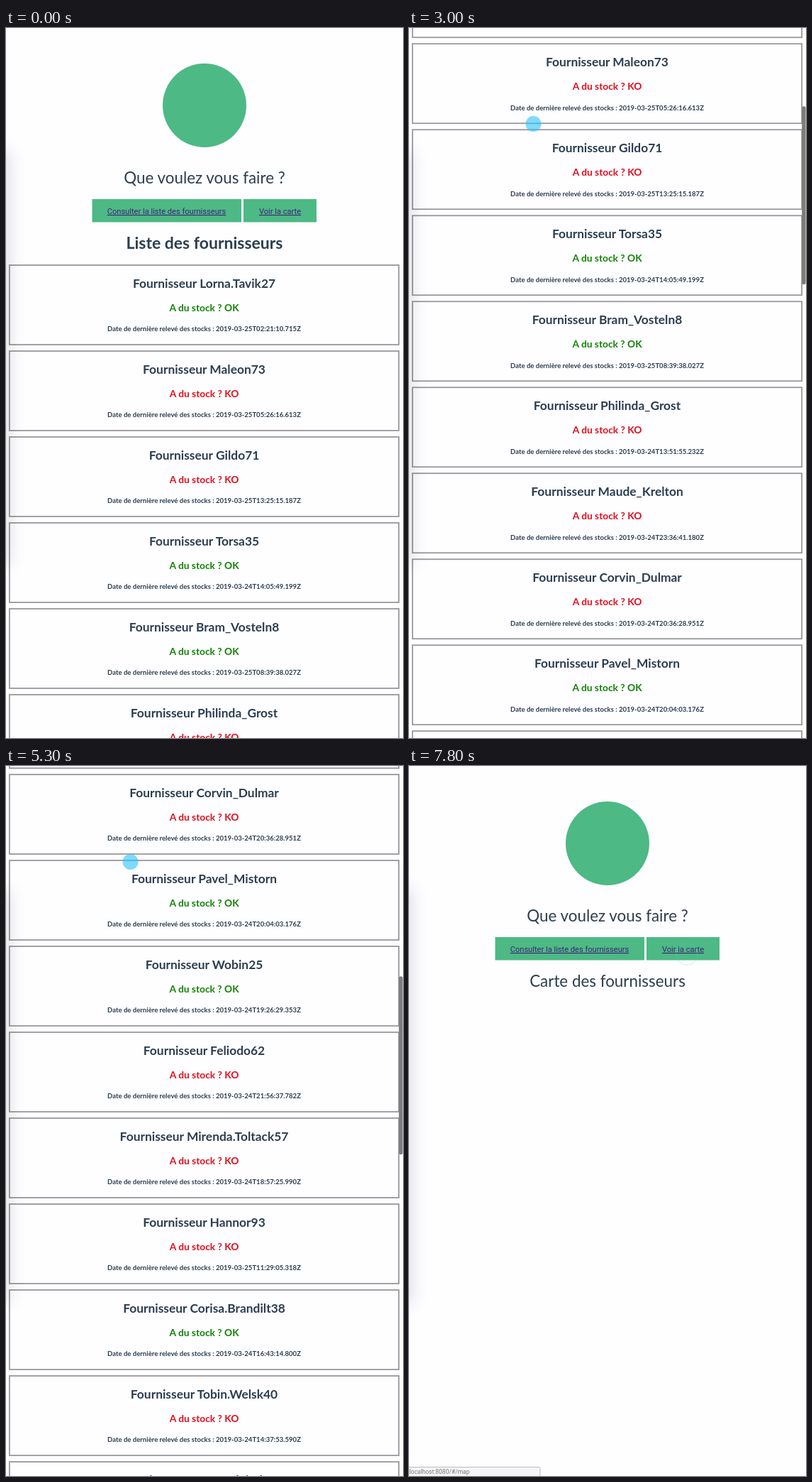
Recreate the animation shown at these times as an HTML page. Size 560 by 1000 pixels, loop 8 s.

```html
<!DOCTYPE html>
<html lang="fr">
<head>
<meta charset="utf-8">
<title>Fournisseurs</title>
<style>
  html, body { margin: 0; width: 100%; height: 100%; overflow: hidden; background: #fefdff; }
  svg { display: block; width: 100%; height: 100%; }
  text { font-family: Lato, sans-serif; fill: #2c3e50; text-anchor: middle; }
  .heading { font-size: 22.4px; }
  .strong { font-size: 23px; font-weight: 700; }
  .name { font-size: 17.4px; font-weight: 700; }
  .stock { font-size: 13.8px; font-weight: 700; }
  .date { font-size: 9.55px; font-weight: 700; }
  .OK { fill: #128205; }
  .KO { fill: #de0f1c; }
  .link { font: 11.1px Roboto, sans-serif; fill: #43207c; text-decoration: underline; }
  .url { font: 8.5px Roboto, sans-serif; fill: #777; text-anchor: start; }
  .card { fill: none; stroke: #999; stroke-width: 1.8; }
  .green { fill: #4db984; }
</style>
</head>
<body>
<svg viewBox="0 0 560 1000">
  <defs>
    <filter id="blur" x="-100%" y="-10%" width="300%" height="120%">
      <feGaussianBlur stdDeviation="12"/>
    </filter>
  </defs>
  <g id="page">
    <circle class="green" cx="280" cy="109" r="59"/>
    <text class="heading" x="280" y="218.7">Que voulez vous faire ?</text>
    <rect class="green" x="121.5" y="241" width="210.5" height="32.5"/>
    <rect class="green" x="335" y="241" width="103" height="32.5"/>
    <text class="link" x="226.5" y="262">Consulter la liste des fournisseurs</text>
    <text class="link" x="386.5" y="262">Voir la carte</text>
    <g id="list">
      <text class="strong" x="280" y="311">Liste des fournisseurs</text>
    </g>
    <text id="map" class="heading" x="280" y="310.7">Carte des fournisseurs</text>
  </g>
  <rect x="-40" y="172" width="44" height="586" fill="#000" opacity=".13" filter="url(#blur)"/>
  <rect id="bar" x="554.2" width="5.4" height="251" rx="2.7" fill="#7c7c7c"/>
  <circle id="dot" r="11" fill="rgba(42,195,248,.6)"/>
  <circle id="ring" r="15" fill="none" stroke="#5cd0e8" stroke-width="1.5"/>
  <g id="status">
    <rect x="-3" y="987.5" width="188" height="16" rx="2" fill="#f6f6f6" stroke="#bbb"/>
    <text class="url" x="0.5" y="997">localhost:8080/#/map</text>
  </g>
</svg>
<script>
const suppliers = [
  ['Lorna.Tavik27', 'OK', '25T02:21:10.715'],
  ['Maleon73', 'KO', '25T05:26:16.613'],
  ['Gildo71', 'KO', '25T13:25:15.187'],
  ['Torsa35', 'OK', '24T14:05:49.199'],
  ['Bram_Vosteln8', 'OK', '25T08:39:38.027'],
  ['Philinda_Grost', 'KO', '24T13:51:55.232'],
  ['Maude_Krelton', 'KO', '24T23:36:41.180'],
  ['Corvin_Dulmar', 'KO', '24T20:36:28.951'],
  ['Pavel_Mistorn', 'OK', '24T20:04:03.176'],
  ['Wobin25', 'OK', '24T19:26:29.353'],
  ['Feliodo62', 'KO', '24T21:56:37.782'],
  ['Mirenda.Toltack57', 'KO', '24T18:57:25.990'],
  ['Hannor93', 'KO', '25T11:29:05.318'],
  ['Corisa.Brandilt38', 'OK', '24T16:43:14.800'],
  ['Tobin.Welsk40', 'KO', '24T14:37:53.590'],
  ['Nerys.Holvindon16', 'KO', '24T17:12:40.264'],
  ['Ottis_Varnel', 'OK', '25T03:48:21.406'],
  ['Dorine55', 'KO', '24T22:10:37.851']
];
const $ = id => document.getElementById(id);

$('list').innerHTML += suppliers.map(([name, stock, date], i) => `
  <g transform="translate(0 ${334 + 121 * i})">
    <rect class="card" x="4.9" y="0" width="549.2" height="112"/>
    <text class="name" x="279.5" y="31.8">Fournisseur ${name}</text>
    <text class="stock ${stock}" x="279.5" y="65">A du stock ? ${stock}</text>
    <text class="date" x="279.5" y="93.3">Date de dernière relevé des stocks : 2019-03-${date}Z</text>
  </g>`).join('');

// Keys are [time, value, value...], interpolated linearly.
const scrollKeys = [[2000, 0], [2300, 27.3], [2500, 125], [3500, 740.5], [4300, 1228.5],
  [4700, 1300], [5000, 1272], [5300, 1169], [6400, 25], [6500, -8], [6800, -.8], [7000, 0]];
const cursorKeys = [[6500, 175.5, 135], [6800, 352, 266], [7000, 384, 265], [7300, 392, 265]];

function sample(keys, t) {
  const next = keys.findIndex(k => k[0] > t);
  if (next === 0) return keys[0].slice(1);
  if (next < 0) return keys[keys.length - 1].slice(1);
  const a = keys[next - 1], b = keys[next];
  const p = (t - a[0]) / (b[0] - a[0]);
  return a.slice(1).map((v, i) => v + (b[i + 1] - v) * p);
}

function show(id, visible) {
  $(id).style.display = visible ? '' : 'none';
}

function draw(now) {
  const time = now % 8000;
  // The screen refreshes twice per half second, after 300 and 200 ms.
  const t = Math.floor(time / 500) * 500 + (time % 500 >= 300 ? 300 : 0);
  const [scroll] = sample(scrollKeys, t);
  const [x, y] = sample(cursorKeys, t);
  const onMap = t >= 7500;

  $('page').setAttribute('transform', `translate(0 ${-scroll})`);
  $('bar').setAttribute('y', 1 + Math.max(0, scroll) * .2525);
  $('dot').setAttribute('transform', `translate(${x} ${y})`);
  $('ring').setAttribute('transform', onMap ? 'translate(392 265)' : 'translate(177 134)');
  $('ring').setAttribute('opacity', t === 7500 ? .5 : .2);

  show('list', !onMap);
  show('map', onMap);
  show('status', t >= 7300);
  show('bar', t >= 2300 && t < 7000);
  show('dot', t >= 2500 && !onMap);
  show('ring', t === 2300 || onMap);
}

const start = performance.now();
function tick() {
  draw(performance.now() - start);
  requestAnimationFrame(tick);
}
tick();
</script>
</body>
</html>
```
